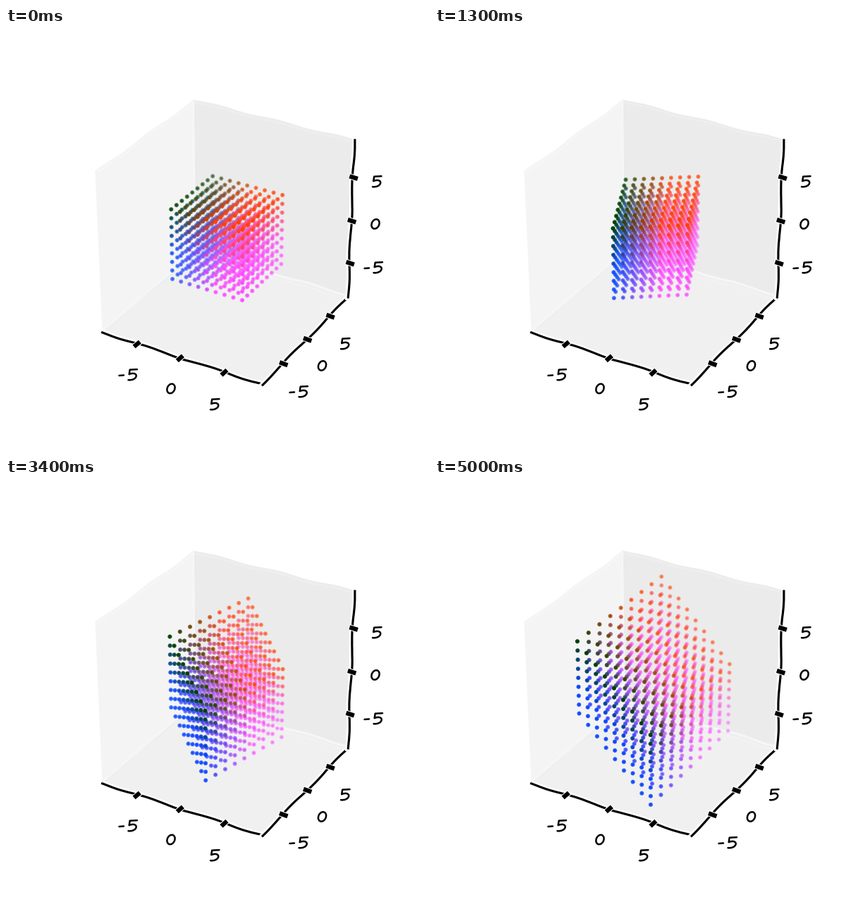
A matplotlib script for the animation above (5100 ms loop, 600 by 600 pixels).

```python
import numpy as np
import matplotlib.pyplot as plt
from matplotlib.animation import FuncAnimation
from matplotlib.lines import Line2D
from matplotlib.patches import Ellipse, PathPatch, Polygon
from matplotlib.path import Path
from matplotlib.patheffects import withStroke

SIZE, DPI = 600, 150
STEPS = 50
LIMIT = 8.8
EDGE = LIMIT * 25 / 24      # the panes reach a little past the limits
DELTA = 2 * LIMIT / 12
DIST = 10
TARGET = np.array([[0, -1, 0],
                   [2, 0, 0],
                   [0, 1, 1]])

ELEV, AZIM = np.radians([30, -60])
RIGHT = np.array([-np.sin(AZIM), np.cos(AZIM), 0])
UP = np.array([-np.sin(ELEV) * np.cos(AZIM), -np.sin(ELEV) * np.sin(AZIM), np.cos(ELEV)])
TOWARD = np.array([np.cos(ELEV) * np.cos(AZIM), np.cos(ELEV) * np.sin(AZIM), np.sin(ELEV)])


def project(points):
    """Screen positions in pixels and distances from the eye."""
    p = np.asarray(points, float) / (2 * LIMIT)
    dist = DIST - p @ TOWARD
    x = (0.095 + p @ RIGHT / dist) / 0.185
    y = (0.095 + p @ UP / dist) / 0.185
    return np.column_stack([75 + 465 * x, 534 - 462 * y]), dist


def px(width):
    return width * 72 / DPI


fig = plt.figure(figsize=(SIZE / DPI, SIZE / DPI), dpi=DPI, facecolor="white")
ax = fig.add_axes([0, 0, 1, 1])
ax.set(xlim=(0, SIZE), ylim=(SIZE, 0))
ax.axis("off")


def sketchy(artist):
    artist.set_sketch_params(1, 100, 2)
    artist.set_path_effects([withStroke(linewidth=4, foreground="w")])
    return artist


def pane(corners, shade):
    xy, _ = project(EDGE * np.array(corners))
    ax.add_patch(sketchy(Polygon(xy, closed=False, color=(shade,) * 3,
                                 alpha=0.5, linewidth=1)))


def line(start, end, width):
    xy, _ = project([start, end])
    ax.add_line(sketchy(Line2D(xy[:, 0], xy[:, 1], color="k", linewidth=width)))


def axis(start, end, along, tickdir, sign):
    start, end = EDGE * np.array(start), EDGE * np.array(end)
    line(start, end, 1.5)
    for value in (-5, 0, 5):
        a = start.copy()
        a[along] = value
        b = a.copy()
        a[tickdir] += 0.1 * sign * DELTA
        b[tickdir] -= 0.2 * sign * DELTA
        line(a, b, 3)


def stroke(points, codes, x, y):
    path = Path(np.array(points) + (x, y), codes)
    ax.add_patch(PathPatch(path, fill=False, edgecolor="k", linewidth=px(2.5),
                           capstyle="round", joinstyle="round"))


def five(x, y, minus=False):
    points = [(6.5, -7.8), (-3.8, -7.3), (-4.8, -0.8),
              (0, -3.2), (5.5, -2.2), (5.2, 1.6),
              (4.8, 5.4), (-0.5, 8), (-6, 7.2)]
    stroke(points, [Path.MOVETO] + [Path.LINETO] * 2 + [Path.CURVE4] * 6, x, y)
    if minus:
        stroke([(-19, 1), (-12.5, 0.5)], [Path.MOVETO, Path.LINETO], x, y)


def zero(x, y):
    ax.add_patch(Ellipse((x, y), 10.5, 14, angle=25, fill=False,
                         edgecolor="k", linewidth=px(2.5)))


pane([(-1, -1, -1), (-1, 1, -1), (-1, 1, 1), (-1, -1, 1)], 0.95)
pane([(-1, 1, -1), (1, 1, -1), (1, 1, 1), (-1, 1, 1)], 0.90)
pane([(-1, -1, -1), (1, -1, -1), (1, 1, -1), (-1, 1, -1)], 0.925)

axis((-1, -1, -1), (1, -1, -1), 0, 1, 1)
axis((1, 1, -1), (1, -1, -1), 1, 0, -1)
axis((1, 1, -1), (1, 1, 1), 2, 0, -1)

for x, y in [(179.5, 492), (421.5, 516), (527.5, 340)]:
    five(x, y, minus=True)
for x, y in [(234, 511.5), (448.5, 479), (524, 278)]:
    zero(x, y)
for x, y in [(296, 534), (481, 448), (526, 218)]:
    five(x, y)

side = np.arange(-4, 5)
grid = np.array(np.meshgrid(side, side, side, indexing="ij")).reshape(3, -1).T
colors = np.column_stack([
    np.minimum((grid[:, 0] + 4) / 5, 1),
    np.full(len(grid), 0.25),
    np.minimum((4 - grid[:, 2]) / 5, 1),
    np.ones(len(grid)),
])
dots = ax.scatter(grid[:, 0], grid[:, 1], s=2, c=colors, linewidths=1.5, zorder=3)
ax.set(xlim=(0, SIZE), ylim=(SIZE, 0))


def update(i):
    t = i / STEPS
    matrix = (1 - t) * np.eye(3) + t * TARGET
    xy, dist = project(grid @ matrix.T)
    # farther dots fade, and are painted first
    z = -1 / dist
    rgba = colors.copy()
    rgba[:, 3] = 1 - 0.7 * (z - z.min()) / (z.max() - z.min())
    order = np.argsort(-dist)
    dots.set_offsets(xy[order])
    dots.set_color(rgba[order])
    return [dots]


anim = FuncAnimation(fig, update, frames=STEPS + 1, interval=100, repeat=True,
                     repeat_delay=0, blit=False)
plt.show()
```
